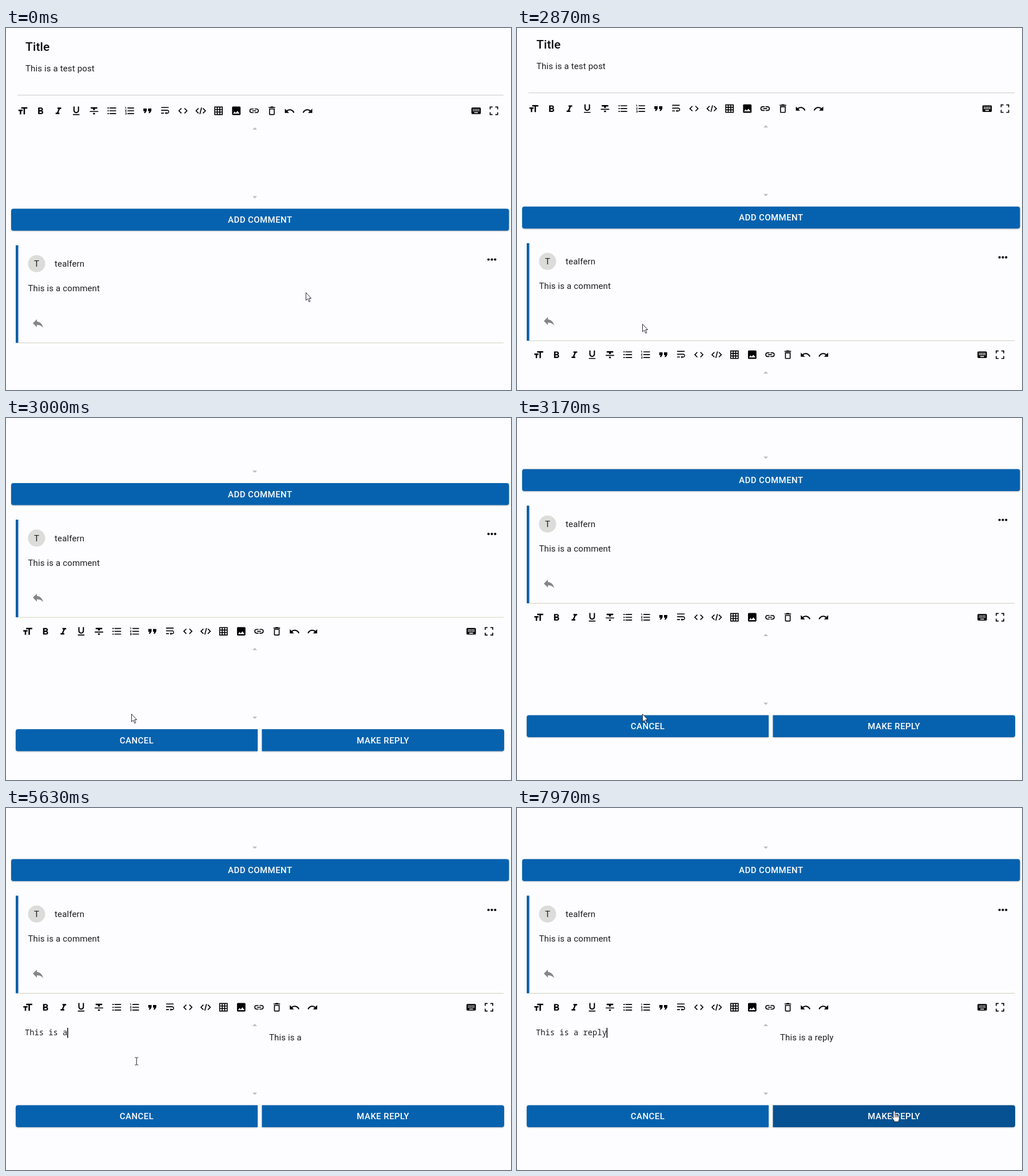
Animation of 883x634 px, one loop 8000 ms. Source, as an HTML page:

```html
<!DOCTYPE html>
<html lang="en">
<head>
<meta charset="utf-8">
<title>Replying to a comment</title>
<style>
  html, body { margin: 0; width: 100%; height: 100%; overflow: hidden; background: #fdfdff; }
  svg { display: block; width: 883px; height: 634px; }
  text { font: 15px Roboto, sans-serif; letter-spacing: .14px; fill: #1c1c1e; white-space: pre; }
  .title { font-size: 21px; font-weight: 500; fill: #0c0c0e; }
  .label { font-weight: 500; letter-spacing: .43px; fill: #fff; text-anchor: middle; }
  .mono { font: 13.77px "Noto Sans Mono", monospace; letter-spacing: 0; }
  .button { fill: #0662ae; filter: drop-shadow(0 1.5px 1px #0004); }
  .line { stroke: #000; fill: none; stroke-width: 2; }
  .cursor { fill: #fff; stroke: #2b2b3a; stroke-width: 1; }
</style>
</head>
<body>
<svg viewBox="0 0 883 634">
  <g id="page">
    <text class="title" x="34" y="39.5">Title</text>
    <text x="34" y="75.5">This is a test post</text>
    <path d="M20 117.5H870" stroke="#cacacc"/>
    <g id="editor"></g>
    <path d="M17 380.5h4.5v171H17z" fill="#0d5fa6"/>
    <circle cx="53.5" cy="412.7" r="15" fill="#dcdcda"/>
    <text x="53.5" y="418" text-anchor="middle">T</text>
    <text x="85" y="418">tealfern</text>
    <path d="M22 551.5H870" stroke="#d0cfbe"/>
    <text x="38.5" y="461">This is a comment</text>
    <g id="dots"></g>
    <path transform="translate(44 505)" fill="#868686"
      d="M10 9V5l-7 7 7 7v-4.1c5 0 8.5 1.6 11 5.1-1-5-4-10-11-11z"/>
    <g id="reply">
      <text class="mono" id="typed" x="33" y="625"></text>
      <path id="caret" d="M0 612h1.5v17.5H0z"/>
      <text id="preview" x="460" y="634"></text>
    </g>
  </g>
  <g id="pointer">
    <path id="arrow" class="cursor" d="M.5.5V14l3-2.8 2.3 5.4 2.1-.9-2.2-5.2h4z"/>
    <g id="hand" class="cursor" transform="translate(-5.6 0)">
      <path d="M4 13V2.2a1.6 1.6 0 0 1 3.2 0V8a1.3 1.3 0 0 1 2.6.3 1.3 1.3 0 0 1 2.4.6 1.2 1.2 0 0 1 2.2.8V14c0 2-1.2 3-1.4 5.5H6C5.6 17 2.5 14 1 11.6c-.8-1.4.6-2.3 1.6-1.3z"/>
      <path d="M7.2 8v4M9.8 8.5V12M12.2 9v3"/>
    </g>
    <path id="beam" d="M-3-6.5h2.2L0-5.8l.8-.7H3M-3 6.5h2.2L0 5.8l.8.7H3M0-6V6" fill="none" stroke="#222"/>
  </g>
</svg>
<script>
const $ = id => document.getElementById(id);
const clamp = v => Math.max(0, Math.min(1, v));
const smooth = u => u * u * (3 - 2 * u);

// Toolbar icons on a 24 unit grid; a leading "*" marks a stroked one.
const ICONS = [
  'M9 4v3h5v12h3V7h5V4H9zm-6 8h3v7h3v-7h3V9H3v3z',
  'M15.6 10.79c.97-.67 1.65-1.77 1.65-2.79 0-2.26-1.75-4-4-4H7v14h7.04c2.09 0 3.71-1.7 3.71-3.79 0-1.52-.86-2.82-2.15-3.42zM10 6.5h3c.83 0 1.5.67 1.5 1.5s-.67 1.5-1.5 1.5h-3v-3zm3.5 9H10v-3h3.5c.83 0 1.5.67 1.5 1.5s-.67 1.5-1.5 1.5z',
  'M10 4v3h2.21l-3.42 8H6v3h8v-3h-2.21l3.42-8H18V4z',
  'M12 17c3.31 0 6-2.69 6-6V3h-2.5v8c0 1.93-1.57 3.5-3.5 3.5S8.5 12.93 8.5 11V3H6v8c0 3.31 2.69 6 6 6zm-7 2v2h14v-2H5z',
  'M10 19h4v-3h-4v3zM5 4v3h5v3h4V7h5V4H5zM3 14h18v-2H3v2z',
  '*M2.5 6h3M2.5 12h3M2.5 18h3M7 6h14M7 12h14M7 18h14',
  'M2 17h2v.5H3v1h1v.5H2v1h3v-4H2v1zm1-9h1V4H2v1h1v3zm-1 3h1.8L2 13.1v.9h3v-1H3.2L5 10.9V10H2v1zm5-6v2h14V5H7zm0 14h14v-2H7v2zm0-6h14v-2H7v2z',
  'M5 17h3l3-5V7H4v6h3zm10 0h3l3-5V7h-7v6h3z',
  'M4 19h6v-2H4v2zM20 5H4v2h16V5zm-3 6H4v2h13.25c1.1 0 2 .9 2 2s-.9 2-2 2H15v-2l-3 3 3 3v-2h2c2.21 0 4-1.79 4-4s-1.79-4-4-4z',
  '*M8.7 6.7 3.4 12l5.3 5.3M15.3 6.7l5.3 5.3-5.3 5.3',
  '*M7.3 6.7 2 12l5.3 5.3M16.7 6.7 22 12l-5.3 5.3M13.8 5l-3.6 14',
  '*M4 4h16v16H4zM4 9.3h16M4 14.7h16M9.3 4v16M14.7 4v16',
  'M21 19V5c0-1.1-.9-2-2-2H5c-1.1 0-2 .9-2 2v14c0 1.1.9 2 2 2h14c1.1 0 2-.9 2-2zM8.5 13.5l2.5 3.01L14.5 12l4.5 6H5l3.5-4.5z',
  '*M11 8H7a4 4 0 0 0 0 8h4M13 8h4a4 4 0 0 1 0 8h-4M8 12h8',
  'M6 19c0 1.1.9 2 2 2h8c1.1 0 2-.9 2-2V7H6v12zM8 9h8v10H8V9zm7.5-5l-1-1h-5l-1 1H5v2h14V4z',
  'M12.5 8c-2.65 0-5.05.99-6.9 2.6L2 7v9h9l-3.62-3.62c1.39-1.16 3.16-1.88 5.12-1.88 3.54 0 6.55 2.31 7.6 5.5l2.37-.78C21.08 11.03 17.15 8 12.5 8z',
  'M18.4 10.6C16.55 8.99 14.15 8 11.5 8c-4.65 0-8.58 3.03-9.96 7.22L3.9 16c1.05-3.19 4.05-5.5 7.6-5.5 1.95 0 3.73.72 5.12 1.88L13 16h9V7l-3.6 3.6z',
  'M20 5H4c-1.1 0-2 .9-2 2v10c0 1.1.9 2 2 2h16c1.1 0 2-.9 2-2V7c0-1.1-.9-2-2-2zm-9 3h2v2h-2V8zm0 3h2v2h-2v-2zM8 8h2v2H8V8zm0 3h2v2H8v-2zm-1 2H5v-2h2v2zm0-3H5V8h2v2zm9 7H8v-2h8v2zm0-4h-2v-2h2v2zm0-3h-2V8h2v2zm3 3h-2v-2h2v2zm0-3h-2V8h2v2z',
  '*M4 9V4h5M15 4h5v5M20 15v5h-5M9 20H4v-5'
];

function add(parent, tag, attrs, text = '') {
  const el = document.createElementNS('http://www.w3.org/2000/svg', tag);
  for (const k in attrs) el.setAttribute(k, attrs[k]);
  el.textContent = text;
  return parent.appendChild(el);
}

function toolbar(parent, inset, y) {
  ICONS.forEach((icon, i) => {
    const stroked = icon[0] === '*';
    const el = add(parent, 'path', { d: icon.slice(stroked), class: stroked ? 'line' : '' });
    const b = el.getBBox();
    const x = i < 17 ? 29.5 + inset + i * 31.1 : 822 - inset + (i - 17) * 31.1;
    el.setAttribute('transform',
      `translate(${x} ${y}) scale(.82) translate(${-b.x - b.width / 2} ${-b.y - b.height / 2})`);
  });
  add(parent, 'path', { fill: '#bcbcc0', d: `M431 ${y + 33}h8l-4-4zM431 ${y + 149.5}h8l-4 4z` });
}

// l and r are the corner radii of the left and right sides.
function button(parent, x, y, w, l, r, label) {
  const h = 38.5;
  const el = add(parent, 'path', { class: 'button', d:
    `M${x + l} ${y}h${w - l - r}q${r} 0 ${r} ${r}v${h - 2 * r}q0 ${r} ${-r} ${r}h${l + r - w}q${-l} 0 ${-l} ${-l}v${2 * l - h}q0 ${-l} ${l} ${-l}z` });
  add(parent, 'text', { class: 'label', x: x + w / 2, y: y + 24.5 }, label);
  return el;
}

toolbar($('editor'), 0, 145);
button($('editor'), 9, 316.5, 870.5, 4, 4, 'ADD COMMENT');
toolbar($('reply'), 8.6, 576);
button($('reply'), 17, 747.5, 423, 4, 0, 'CANCEL');
const send = button($('reply'), 447.5, 747.5, 423.5, 0, 4, 'MAKE REPLY');
for (const x of [843.7, 849.5, 855.3]) add($('dots'), 'circle', { cx: x, cy: 405.5, r: 2.1 });

const MESSAGE = 'This is a reply';
const KEYS = [4400, 4770, 4830, 4900, 5030, 5130, 5230, 5330, 5630, 5770, 6130, 6300, 6600, 6770, 6830];
const FOCUS = 3670;

// Pointer moves: start, end, target x, target y
const MOVES = [[930, 1770, 59, 511], [2280, 2680, 219, 518], [3230, 3500, 228.3, 443.5], [7350, 7880, 659.6, 530]];

function pointerAt(t) {
  let x = 524, y = 463;
  for (const [from, to, tx, ty] of MOVES) {
    const p = smooth(clamp((t - from) / (to - from)));
    x += (tx - x) * p;
    y += (ty - y) * p;
  }
  return [x, y];
}

function shapeAt(t, x, y) {
  if (t < 2700) return x < 74 ? 'hand' : 'arrow';
  if (t > 7000 && y > 520) return 'hand';
  return t > 3260 && x < 435 ? 'beam' : 'arrow';
}

const show = (el, on) => { el.style.display = on ? '' : 'none'; };

function draw() {
  const t = performance.now() % 8000;
  const scroll = 227 * smooth(clamp((t - 2857) / 181));
  $('page').setAttribute('transform', `translate(0 ${-scroll})`);
  show($('reply'), t >= 2130);

  const count = KEYS.filter(k => k <= t).length;
  const lastInput = count ? KEYS[count - 1] : FOCUS;
  $('typed').textContent = $('preview').textContent = MESSAGE.slice(0, count);
  $('caret').setAttribute('transform', `translate(${32.7 + count * 8.26} 0)`);
  show($('caret'), t >= FOCUS && Math.floor((t - lastInput) / 500) % 2 === 0);

  const hover = clamp((t - 7830) / 250);
  send.style.fill = `color-mix(in srgb, #0662ae, #04447a ${hover * 100}%)`;

  const [x, y] = pointerAt(t);
  $('pointer').setAttribute('transform', `translate(${x} ${y})`);
  const shape = shapeAt(t, x, y);
  for (const id of ['arrow', 'hand', 'beam']) show($(id), id === shape);
  requestAnimationFrame(draw);
}
draw();
</script>
</body>
</html>
```
